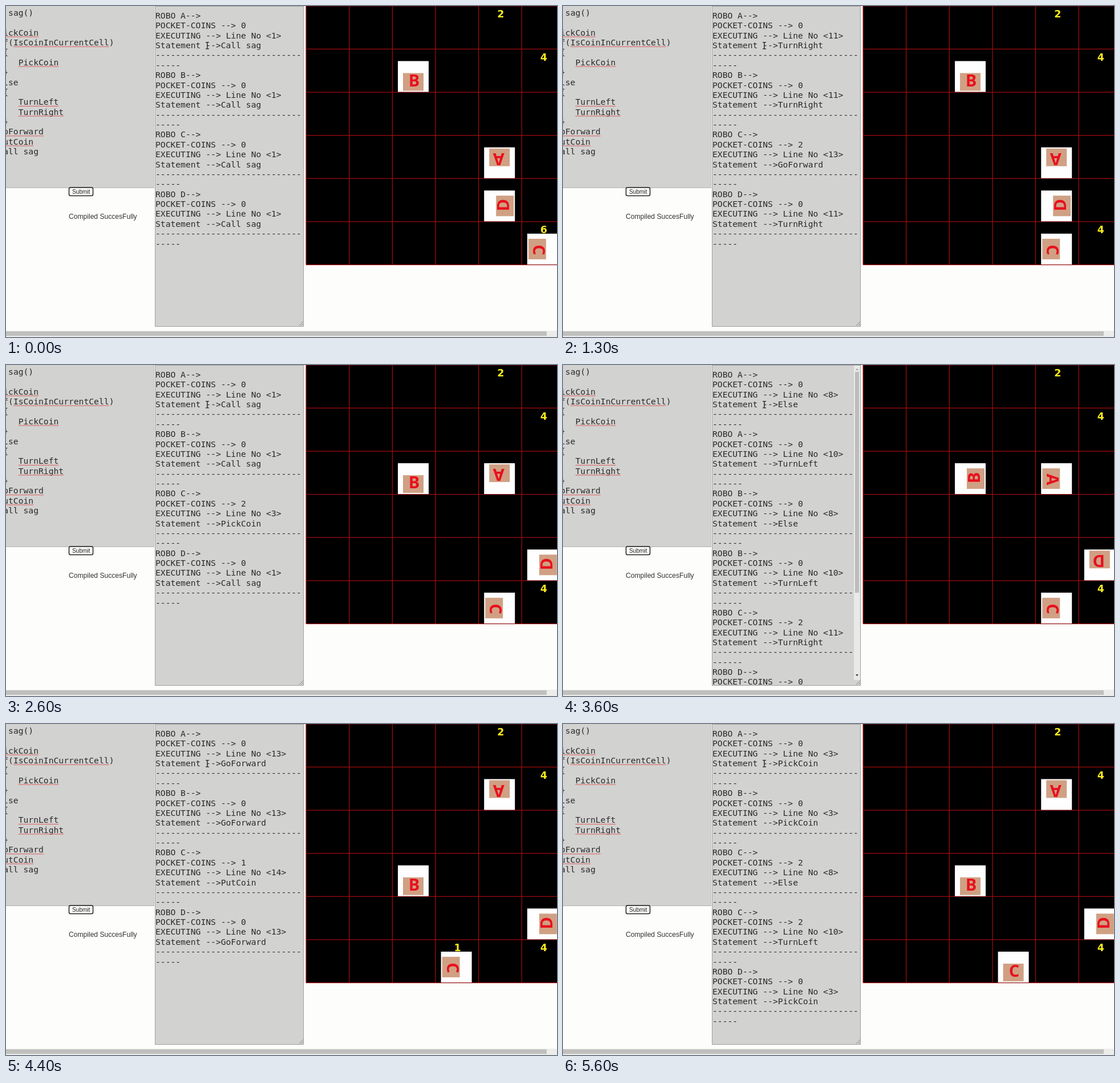
These frames come from a looping animation (966x580 px, 6000 ms). An HTML page with a canvas:

```html
<!DOCTYPE html>
<html lang="en">
<head>
<meta charset="utf-8">
<title>Robot grid</title>
<style>
html, body { margin: 0; width: 100%; height: 100%; overflow: hidden; background: #fdfdfc; }
canvas { display: block; }
</style>
</head>
<body>
<canvas id="stage" width="966" height="580"></canvas>
<script>
const ctx = document.getElementById('stage').getContext('2d');
const LOOP = 6000;
const MONO = '14.67px "DejaVu Sans Mono", monospace';
const CHAR = 8.83, LINE = 17.37;
const CELL = 75.6, GRID_X = 525.5, GRID_Y = -0.8, SIZE = 6;

const STATEMENTS = {
  1: 'Call sag', 3: 'PickCoin', 4: 'If', 6: 'PickCoin', 8: 'Else',
  10: 'TurnLeft', 11: 'TurnRight', 13: 'GoForward', 14: 'PutCoin'
};

// Column and text of each program line; a leading ~ marks a spelling underline.
const PROGRAM = [
  [[2, 'sag()']], [], [[0, '~PickCoin']],
  [[0, 'if('], [3, '~IsCoinInCurrentCell'], [22, ')']],
  [[1, '{']], [[4, '~PickCoin']], [[1, '}']], [[0, 'else']], [[1, '{']],
  [[4, '~TurnLeft']], [[4, '~TurnRight']], [[1, '}']],
  [[0, '~GoForward']], [[0, '~PutCoin']], [[0, 'Call sag']]
];

// Start time and the program lines each robot runs in that step.
const STEPS = [
  [0, 'A1 B1 C1 D1'],
  [300, 'A3 B3 C3 D3'],
  [900, 'A8 A10 B8 B10 C4 C6 D8 D10'],
  [1300, 'A11 B11 C13 D11'],
  [1700, 'A13 B13 C14 D13'],
  [2200, 'A14 B14 C1 D14'],
  [2600, 'A1 B1 C3 D1'],
  [3100, 'A3 B3 C8 C10 D3'],
  [3600, 'A8 A10 B8 B10 C11 D8 D10'],
  [4000, 'A11 B11 C13 D11'],
  [4400, 'A13 B13 C14 D13'],
  [4900, 'A14 B14 C1 D14'],
  [5200, 'A1 B1 C3 D1'],
  [5600, 'A3 B3 C8 C10 D3']
];

// Quarter turns clockwise: 0 down, 1 left, 2 up, 3 right.
const MOVES = [[0, 1], [-1, 0], [0, -1], [1, 0]];

function buildScenes() {
  const robots = {
    A: { x: 4, y: 3, turn: 2, pocket: 0 },
    B: { x: 2, y: 1, turn: 0, pocket: 0 },
    C: { x: 5, y: 5, turn: 1, pocket: 0 },
    D: { x: 4, y: 4, turn: 3, pocket: 0 }
  };
  const coins = { '4,0': 2, '5,1': 4, '5,5': 6 };
  const clamp = v => Math.max(0, Math.min(SIZE - 1, v));

  function run(bot, line) {
    const key = bot.x + ',' + bot.y;
    const here = coins[key] || 0;
    if (STATEMENTS[line] === 'PickCoin' && here) {
      coins[key] = here - 1;
      bot.pocket++;
    } else if (line === 14 && bot.pocket) {
      coins[key] = here + 1;
      bot.pocket--;
    } else if (line === 10) {
      bot.turn = (bot.turn + 3) % 4;
    } else if (line === 11) {
      bot.turn = (bot.turn + 1) % 4;
    } else if (line === 13) {
      bot.x = clamp(bot.x + MOVES[bot.turn][0]);
      bot.y = clamp(bot.y + MOVES[bot.turn][1]);
    }
  }

  return STEPS.map(([start, script]) => {
    const log = script.split(' ').map(cmd => {
      const name = cmd[0], line = +cmd.slice(1);
      run(robots[name], line);
      return { name, line, pocket: robots[name].pocket };
    });
    return {
      start, log,
      coins: { ...coins },
      robots: Object.entries(robots).map(([name, bot]) => ({ name, ...bot }))
    };
  });
}

function rect(x, y, w, h, color) {
  ctx.fillStyle = color;
  ctx.fillRect(x, y, w, h);
}

function text(str, x, y, font, color, align = 'left') {
  ctx.font = font;
  ctx.fillStyle = color;
  ctx.textAlign = align;
  ctx.fillText(str, x, y);
}

function poly(points, color) {
  ctx.fillStyle = color;
  ctx.beginPath();
  points.forEach(([x, y]) => ctx.lineTo(x, y));
  ctx.fill();
}

function drawEditor() {
  rect(0, 0, 259, 318, '#d2d2d1');
  rect(259, 0, 1, 319, '#c0c0bf');
  rect(0, 318, 260, 1, '#b0b0af');
  PROGRAM.forEach((parts, row) => parts.forEach(([col, raw]) => {
    const str = raw.replace('~', '');
    const x = -13.6 + col * CHAR, y = 17 + row * LINE;
    text(str, x, y, MONO, '#2a2a2a');
    if (str !== raw) rect(x, y + 1.6, str.length * CHAR, 1.2, '#d8706c');
  }));

  ctx.strokeStyle = '#222';
  ctx.lineWidth = 1.5;
  ctx.beginPath();
  ctx.roundRect(110.5, 318, 42, 14.5, 2.5);
  ctx.stroke();
  text('Submit', 131.8, 328.6, '10.2px "Liberation Sans", sans-serif', '#222', 'center');
  text('Compiled SuccesFully', 110, 373.3, '12.1px "Liberation Sans", sans-serif', '#333');
}

function drawLog(log) {
  rect(261, 0, 261, 562, '#a0a09f');
  rect(262, 1, 259, 560, '#d2d2d1');
  const long = log.length > 5;
  const fit = long ? 28 : 29;

  ctx.save();
  ctx.beginPath();
  ctx.rect(262, 0, 259, 561);
  ctx.clip();
  log.forEach(({ name, line, pocket }, i) => {
    [
      `ROBO ${name}-->`,
      `POCKET-COINS --> ${pocket}`,
      `EXECUTING --> Line No <${line}>`,
      `Statement -->${STATEMENTS[line]}`,
      '-'.repeat(fit),
      '-'.repeat(34 - fit)
    ].forEach((str, j) => text(str, 262, 22 + (i * 6 + j) * LINE, MONO, '#2a2a2a'));
  });
  ctx.restore();

  if (long) {
    rect(510, 1, 11, 551, '#e9e9e8');
    rect(512, 12, 7, log.length > 7 ? 340 : 387, '#bcbcbb');
    poly([[513, 9], [518, 9], [515.5, 6]], '#a0a0a0');
    poly([[513, 542], [518, 542], [515.5, 545.5]], '#444');
  }
  ctx.strokeStyle = '#888';
  ctx.lineWidth = 1;
  ctx.beginPath();
  for (const d of [3, 7]) {
    ctx.moveTo(521 - d, 560);
    ctx.lineTo(521, 560 - d);
  }
  ctx.stroke();
}

function drawPointer() {
  rect(352.2, 64, 1.4, 11, '#222');
  rect(350, 63, 6, 1.2, '#222');
  rect(350, 74.5, 6, 1.2, '#222');
}

function drawRobot({ name, x, y, turn }) {
  ctx.save();
  ctx.translate(GRID_X + x * CELL + 37.3, GRID_Y + y * CELL + 48.7);
  ctx.rotate(turn * Math.PI / 2);
  rect(-27, -27, 54, 54, '#fefefe');
  rect(-18, -6, 36, 31, '#d0a084');
  ctx.fontStretch = 'extra-condensed';
  text(name, 1.5, 17, 'bold 29px "Noto Sans", Roboto, sans-serif', '#e8101c', 'center');
  ctx.restore();
}

function drawGrid({ coins, robots }) {
  rect(526, 0, 440, 453, '#000');
  for (let i = 0; i <= SIZE; i++) {
    rect(GRID_X + i * CELL, 0, 1.3, 453, '#9c0c0e');
    rect(526, GRID_Y + i * CELL, 440, 1.3, '#9c0c0e');
  }
  for (const key in coins) {
    if (!coins[key]) continue;
    const [x, y] = key.split(',');
    text(coins[key], GRID_X + x * CELL + 39.3, GRID_Y + y * CELL + 20.9,
      'bold 17.4px "DejaVu Sans", sans-serif', '#f8ec1c', 'center');
  }
  robots.forEach(drawRobot);
}

const scenes = buildScenes();

function draw(now) {
  const t = now % LOOP;
  const scene = scenes.findLast(s => s.start <= t);
  rect(0, 0, 966, 580, '#fdfdfc');
  drawEditor();
  drawLog(scene.log);
  drawPointer();
  drawGrid(scene);
  rect(0, 569, 966, 11, '#ececeb');
  rect(0, 570, 948, 8, '#c0c0bf');
}

const begin = performance.now();
function tick() {
  draw(performance.now() - begin);
  requestAnimationFrame(tick);
}
tick();
</script>
</body>
</html>
```
